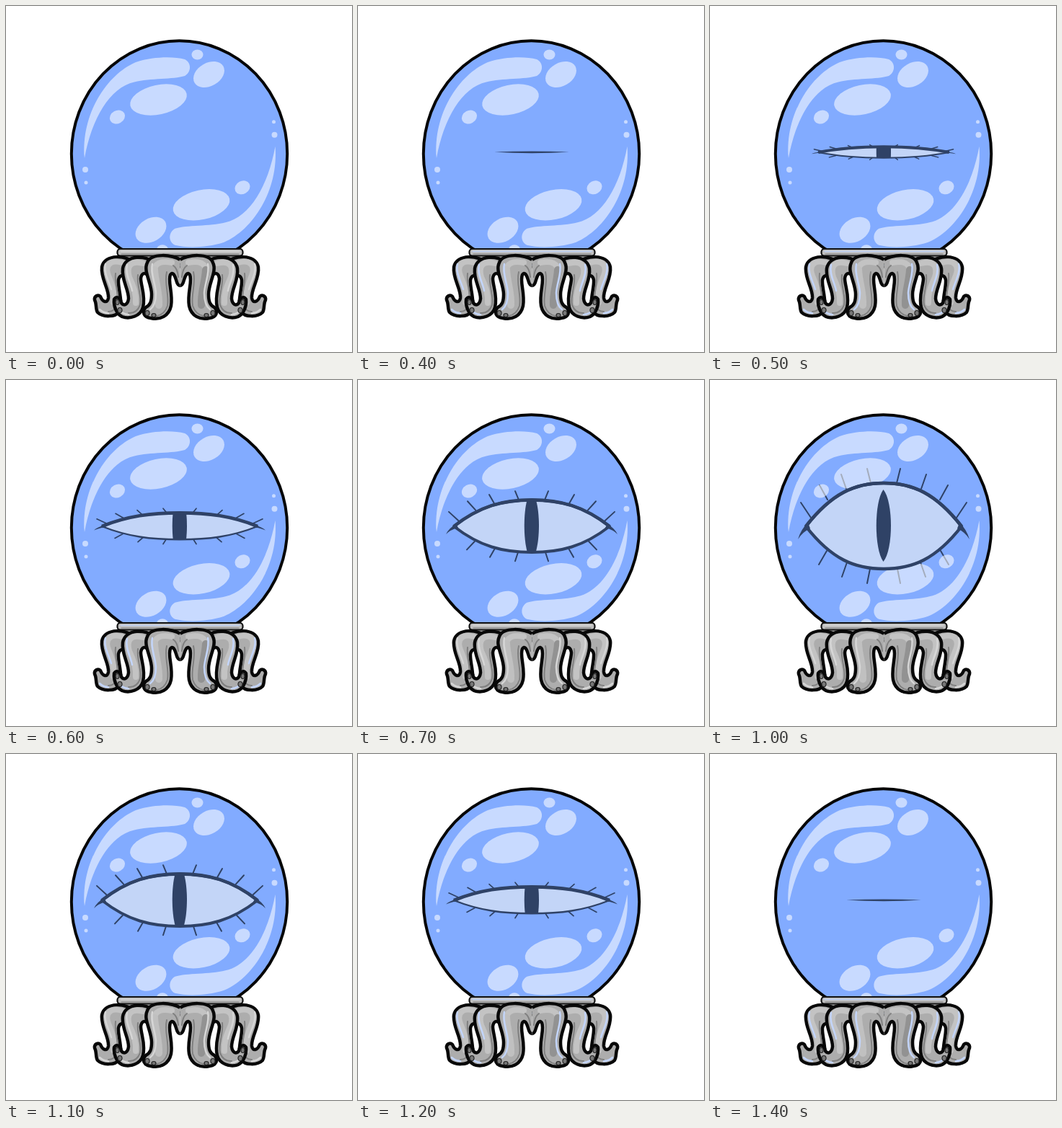
Animation, 480 px wide and 480 px high, one loop 1500 ms. Source, as an HTML page:

```html
<!DOCTYPE html>
<html lang="en">
<head>
<meta charset="utf-8">
<title>Crystal ball eye</title>
<style>
html, body { margin: 0; width: 100%; height: 100%; overflow: hidden; background: #fff; }
svg {
  display: block; width: 100%; height: 100%;
  --sx: 1; --sy: 1; --eye: 0; --line: 0; --lid: 4; --brow: 4; --lash: 2; --shine: #d6d6d6;
  animation: blink 1.5s step-end infinite;
}
/* Each pose holds until the next one. */
@keyframes blink {
  0% { --eye: 0; --line: 0; --sx: 1; --sy: 1; --lid: 4; --brow: 4; --lash: 2; --shine: #d6d6d6; }
  26.66%, 93.33% { --eye: 0; --line: 1; --sx: 1; --sy: 1; --lid: 4; --brow: 4; --lash: 2; --shine: #c3d5fa; }
  33.33%, 86.66% { --eye: 1; --line: 0; --sx: .84; --sy: .13; --lid: 2; --brow: 4; --lash: 1.5; --shine: #c3d5fa; }
  40%, 80% { --eye: 1; --line: 0; --sx: 1; --sy: .31; --lid: 2.4; --brow: 4.6; --lash: 1.7; --shine: #c3d5fa; }
  46.66%, 73.33% { --eye: 1; --line: 0; --sx: 1; --sy: .61; --lid: 4; --brow: 4.6; --lash: 2; --shine: #d6d6d6; }
  53.33% { --eye: 1; --line: 0; --sx: 1; --sy: 1; --lid: 4.4; --brow: 4.6; --lash: 2; --shine: #d6d6d6; }
  100% { --eye: 0; --line: 0; --sx: 1; --sy: 1; --lid: 4; --brow: 4; --lash: 2; --shine: #d6d6d6; }
}
.open { opacity: var(--eye); transform: scale(var(--sx), var(--sy)); }
.unscaled { transform: scale(calc(1 / var(--sx)), calc(1 / var(--sy))); }
.closed { opacity: var(--line); }
.steady { vector-effect: non-scaling-stroke; }
.lid, .brow, .lash { fill: none; stroke: #2f4266; stroke-linejoin: round; }
.lid { stroke-width: var(--lid); }
.brow { stroke-width: var(--brow); }
.lash { stroke-width: var(--lash); stroke-linecap: round; }
.navy { fill: #2f4266; }
.glow { fill: #fff; fill-opacity: .56; }
.limb { fill: #adadad; stroke: #080808; stroke-width: 4.500; stroke-linejoin: round; }
.light, .tone, .shine, .shade { fill: none; stroke-linecap: round; }
.light { stroke: #c3c3c3; stroke-width: 8; }
.tone { stroke: var(--tone); stroke-width: 10; }
.shine { stroke: var(--shine); stroke-width: 2.500; }
.shade { stroke: #808080; stroke-width: 2; }
.sucker { fill: #777; stroke: #222; stroke-width: 1.200; }
</style>
</head>
<body>
<svg viewBox="0 0 480 480">
  <defs>
    <path id="lens" class="steady" d="M-108 0C-72-46-40-60 0-60S72-46 108 0C72 46 40 59 0 59S-72 46-108 0Z"/>
    <path id="brow" class="steady" d="M-108 0C-72-46-40-60 0-60S72-46 108 0"/>
    <clipPath id="lensClip"><use href="#lens"/></clipPath>
    <path id="lashes" class="steady" d="M-115-33L-101-12M-89-57L-78-37M-59-72L-52-52M-23-80L-18-60
      M-90 53L-79 34M-58 70L-51 50M-23 79L-19 59"/>
    <path id="tail" d="M-105-5Q-115 4-119 18Q-113 8-102 3Z"/>

    <g id="glints">
      <path d="M109 211C104 150 140 95 180 78C205 70 232 70 248 74C258 79 257 92 248 97C232 102 200 100 178 105.500C144 113 119 156 109 211Z"/>
      <ellipse rx="40" ry="20.500" transform="translate(211.500 130) rotate(-12)"/>
      <ellipse rx="11" ry="9" transform="translate(154.500 154) rotate(-28)"/>
      <ellipse rx="23" ry="16" transform="translate(281.500 95) rotate(-30)"/>
      <ellipse cx="265.500" cy="67.500" rx="8" ry="7"/>
      <circle cx="110" cy="227" r="4"/>
      <circle cx="111" cy="245" r="2.500"/>
    </g>

    <g id="limbs">
      <path class="limb" d="M178 356C168 346 137 343 133 362C131 378 143 392 142 405C141 413 134 411 131 403
        C128 400 122 402 123 408C126 413 124 421 127 425C134 432 152 432 157 424C163 410 155 392 156 380
        C157 374 162 372 166 376"/>
      <path class="light" d="M161 356C143 351 137 361 142 374C147 386 151 397 149 411"/>
      <path class="shine" d="M138 358C135 369 143 383 146 393M130 421Q135 426 142 426"/>
      <path class="shade" d="M152 371C150 387 158 400 154 414Q151 424 142 424"/>

      <path class="limb" d="M204 356C196 346 166 344 162 364C160 380 170 392 170 406C169 414 164 417 160 412
        C159 404 153 402 150 407C149 416 153 427 161 431C172 435 187 430 190 418C194 402 187 388 187 378
        C188 371 192 369 196 373"/>
      <path class="light" d="M190 357C172 352 167 362 171 376C175 386 181 396 180 412"/>
      <path class="shine" d="M168 359C165 371 173 384 175 395M157 421Q162 428 170 428"/>
      <path class="shade" d="M183 373C181 388 189 402 186 415Q181 427 170 426"/>
      <ellipse class="sucker" cx="154.500" cy="411" rx="2.500" ry="3.500"/>
      <ellipse class="sucker" cx="158" cy="422" rx="3" ry="3.500"/>

      <path class="limb" d="M241.500 352C232 345 201 342 196 356C190 368 202 384 202 400C202 410 200 415 194 418
        C188 424 191 432 201 433C214 436 226 430 229 416C232 398 224 382 228 373C231 368 234 373 236 380
        Q238 388 241.500 388"/>
      <path class="light" d="M230 356C214 353 206 357 206 368"/>
      <path class="tone" d="M206 366C207 384 213 397 212 415"/>
      <path class="shine" d="M203 358C200 370 207 384 208 398C208 412 204 418 200 421"/>
      <path class="shade" d="M223 369C219 385 227 401 224 416Q220 428 209 430M232 360Q238 364 239 376"/>
      <ellipse class="sucker" cx="196" cy="426" rx="3" ry="3.500"/>
      <ellipse class="sucker" cx="205" cy="429" rx="3" ry="2.500"/>
    </g>
  </defs>

  <ellipse cx="240.500" cy="205" rx="149.700" ry="156.700" fill="#82abff" stroke="#050505" stroke-width="4"/>

  <g transform="translate(241 203)">
    <g class="open lash">
      <use href="#lashes"/>
      <use href="#lashes" transform="scale(-1 1)"/>
    </g>
  </g>

  <g class="glow">
    <use href="#glints"/>
    <use href="#glints" transform="rotate(180 241.250 202.900)"/>
  </g>

  <g transform="translate(241 203)">
    <g class="open">
      <use href="#lens" fill="#c3d5f7"/>
      <g clip-path="url(#lensClip)">
        <g class="unscaled"><path class="navy" d="M-.5-51C13.500-34 13.500 32-.5 49C-13.500 32-13.500-34-.5-51Z"/></g>
      </g>
      <use href="#lens" class="lid"/>
      <use href="#brow" class="brow"/>
      <g class="navy">
        <use href="#tail"/>
        <use href="#tail" transform="scale(-1 1)"/>
      </g>
    </g>
    <path class="closed navy" d="M-52-.5Q0-2.500 52-.5Q0 3-52-.5Z"/>
  </g>

  <rect x="158" y="344" width="167" height="14" fill="#b4b4b4" stroke="#111" stroke-width="2"/>
  <rect x="154.500" y="337" width="174" height="9.500" rx="4" fill="#c0c0c0" stroke="#111" stroke-width="2.200"/>
  <path d="M159 340.500H324" class="shine" style="stroke-width:1.500"/>
  <path d="M160 344H323M162 350.500H321" class="shade" style="stroke-width:1.200"/>
  <use href="#limbs" style="--tone: #c0c0c0"/>
  <use href="#limbs" transform="translate(483 0) scale(-1 1)" style="--tone: #929292"/>
</svg>
</body>
</html>
```
